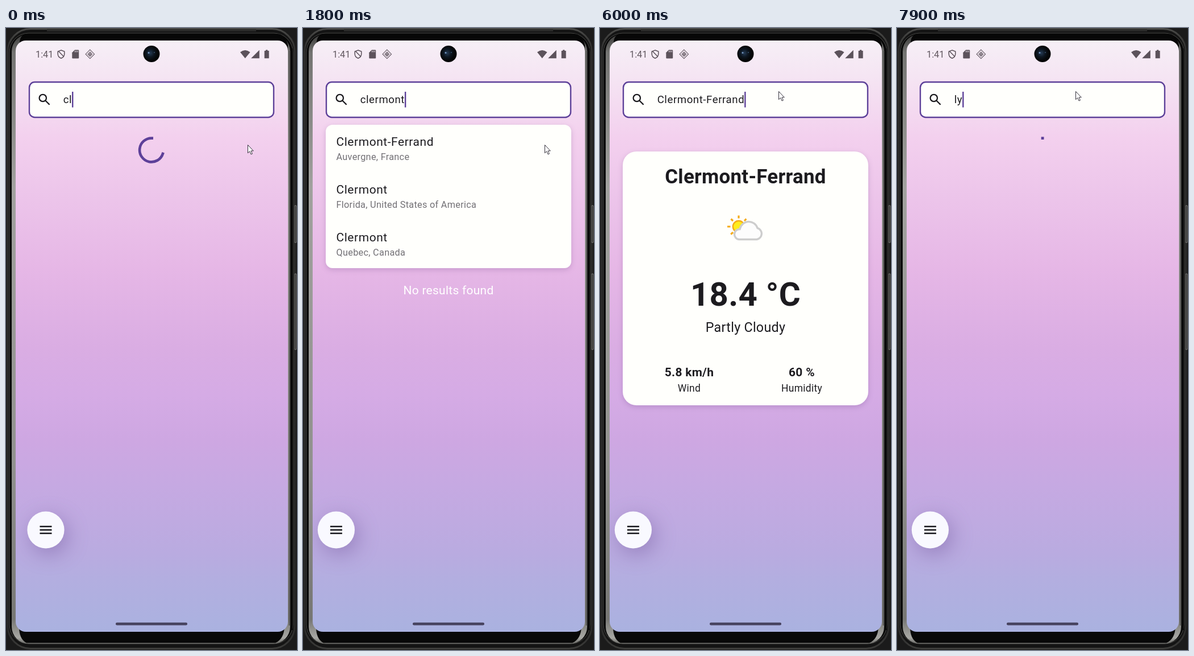
Recreate the animation shown at these times as an HTML page. Size 512 by 1093 pixels, loop 8 s.

```html
<!DOCTYPE html>
<html lang="en">
<head>
<meta charset="utf-8">
<title>Weather search</title>
<style>
  html, body { margin: 0; width: 100%; height: 100%; overflow: hidden; background: #1b1b1b; }
  svg { display: block; width: 512px; height: 1093px; }
  text { font-family: Roboto, sans-serif; fill: #1c1b1f; letter-spacing: .29px; white-space: pre; }
  .mid { text-anchor: middle; }
  .field { font-size: 18.6px; letter-spacing: .58px; }
  .place { font-size: 20.93px; letter-spacing: .58px; }
  .region { font-size: 16.28px; fill: #727075; }
  .city { font-size: 34.89px; font-weight: 700; }
  .degrees { font-size: 58.15px; font-weight: 700; }
  .sky { font-size: 23.26px; }
  .value { font-size: 20.93px; font-weight: 700; }
  .label { font-size: 17.45px; }
  .none { font-size: 20.93px; fill: #fff; }
  .panel { fill: #fffffc; filter: drop-shadow(0 3px 5px rgba(90, 50, 120, .22)); }
  .fab { filter: drop-shadow(6px 10px 18px rgba(85, 55, 130, .36)); }
  .accent { stroke: #5d4099; fill: none; }
</style>
</head>
<body>
<svg viewBox="0 0 512 1093">
  <defs>
    <linearGradient id="sky" gradientUnits="userSpaceOnUse" x1="0" y1="22" x2="0" y2="1061">
      <stop offset="0" stop-color="#f6eff6"/>
      <stop offset=".06" stop-color="#f5e5f3"/>
      <stop offset=".165" stop-color="#f3d0ee"/>
      <stop offset=".27" stop-color="#ecc4ea"/>
      <stop offset=".385" stop-color="#e6b7e6"/>
      <stop offset=".52" stop-color="#daade3"/>
      <stop offset=".6" stop-color="#d5abe5"/>
      <stop offset=".675" stop-color="#cea7e2"/>
      <stop offset=".75" stop-color="#c6a9e2"/>
      <stop offset=".87" stop-color="#b9abe0"/>
      <stop offset=".91" stop-color="#b3aee0"/>
      <stop offset="1" stop-color="#aab2e0"/>
    </linearGradient>
    <linearGradient id="metal" x1="0" y1="0" x2="0" y2="1">
      <stop offset="0" stop-color="#3a3a39"/>
      <stop offset=".03" stop-color="#747472"/>
      <stop offset=".25" stop-color="#a2a29f"/>
      <stop offset=".7" stop-color="#92928f"/>
      <stop offset=".96" stop-color="#777774"/>
      <stop offset=".99" stop-color="#a8a8a4"/>
      <stop offset="1" stop-color="#6a6a67"/>
    </linearGradient>
    <linearGradient id="rim" x1="0" y1="0" x2="0" y2="1">
      <stop offset="0" stop-color="#4a4a48"/>
      <stop offset=".03" stop-color="#30302f"/>
      <stop offset=".97" stop-color="#2b2b2a"/>
      <stop offset="1" stop-color="#3c3c3a"/>
    </linearGradient>
    <radialGradient id="lens" cx=".42" cy=".45" r=".6">
      <stop offset="0" stop-color="#253b55"/>
      <stop offset=".4" stop-color="#0d1620"/>
      <stop offset=".75" stop-color="#050607"/>
    </radialGradient>
    <clipPath id="glass"><rect x="17" y="22" width="479" height="1039" rx="18"/></clipPath>
  </defs>

  <!-- phone body -->
  <rect width="512" height="1093" fill="#1b1b1b"/>
  <rect x="3" y="1.5" width="505" height="1089" rx="40" fill="#141414" stroke="url(#rim)" stroke-width="3"/>
  <rect x="6" y="9" width="499" height="1073" rx="34" fill="#080808" stroke="#484846"/>
  <path d="M72 2H440V6H72z" fill="#2b2b2a"/>
  <rect x="10" y="11" width="490" height="1071" rx="30" fill="url(#metal)"/>
  <path d="M34 10.500H480Q492 13 496 30V40H24V24Q25 13 34 10.500z" fill="#070707"/>
  <path d="M23 1052Q23 1074 36 1080.500H474Q489 1074 490 1052z" fill="#080808"/>
  <path d="M499 40V1050" stroke="#5c5c5a" stroke-width="3"/>
  <path d="M502.500 36V1058" stroke="#090909" stroke-width="4"/>
  <path d="M508 312h2.500v65H508zM508 432h2.500v133H508z" fill="#222" stroke="#80807d"/>

  <!-- screen -->
  <g clip-path="url(#glass)">
    <rect x="17" y="22" width="479" height="1039" fill="url(#sky)"/>

    <text x="52" y="51.5" style="font-size:16.3px;letter-spacing:0;fill:#61575f">1:41</text>
    <g fill="#5c525b">
      <path d="M97 39l5.800 2.300v4.200c0 3.800-2.300 6.400-5.800 7.800-3.500-1.400-5.800-4-5.800-7.800v-4.200zM92.500 41l9 9" fill="none" stroke="#5c525b" stroke-width="1.500"/>
      <path d="M121 38.500h6a1.200 1.200 0 0 1 1.200 1.200v12.600a1.200 1.200 0 0 1-1.200 1.200h-9.500a1.200 1.200 0 0 1-1.200-1.200v-9z"/>
      <path d="M121.500 40v2.500m2.300-2.500v2.500m2.300-2.500v2.500" stroke="#f3e9f2"/>
      <path d="M147.800 38.200l7.700 7.700-7.700 7.700-7.700-7.700z" fill="none" stroke="#6b616a" stroke-width="1.200"/>
      <path d="M147.800 42.300l3.600 3.600-3.600 3.600-3.600-3.600zM146 44l3.600 3.800M149.600 44l-3.600 3.800" fill="none" stroke="#6b616a" stroke-width="1.300"/>
      <path d="M412 42.500Q420.800 35.500 429.600 42.500L420.800 53.300z"/>
      <path d="M445.800 38.700V53.300H431.200z"/>
      <path d="M457 38.500h3.400v1.500h2.300v13.300h-8V40h2.300z"/>
    </g>
    <circle cx="256" cy="45.5" r="14.5" fill="url(#lens)"/>
    <circle cx="251" cy="43.5" r="1.5" fill="#7395c0"/>
    <circle cx="261" cy="43" r="1" fill="#39536f"/>

    <rect x="41" y="95" width="430" height="62" rx="9.5" class="accent" stroke-width="2.4" style="fill:#fffffc"/>
    <path d="M71 123a6.200 6.200 0 1 1-12.400 0a6.200 6.200 0 1 1 12.400 0M69.300 127.500l7.300 7.300" fill="none" stroke="#1c1b1f" stroke-width="2.3"/>
    <text id="query" class="field" x="100.7" y="132"></text>
    <rect id="caret" y="112" width="2.4" height="27.5" fill="#5d4099"/>

    <path id="spinner" class="accent" stroke-width="4.65" stroke-linecap="square"/>

    <g id="list">
      <rect class="panel" x="40" y="170" width="432" height="252" rx="12"/>
      <text class="place" x="58.5" y="206.5">Clermont-Ferrand</text>
      <text class="region" x="58.5" y="232">Auvergne, France</text>
      <text class="place" x="58.5" y="290.5">Clermont</text>
      <text class="region" x="58.5" y="316">Florida, United States of America</text>
      <text class="place" x="58.5" y="374.5">Clermont</text>
      <text class="region" x="58.5" y="400">Quebec, Canada</text>
      <text class="none mid" x="256" y="468">No results found</text>
    </g>

    <g id="card">
      <rect class="panel" x="40" y="217" width="432" height="446" rx="24"/>
      <text class="city mid" x="256" y="273">Clermont-Ferrand</text>
      <g id="weather">
        <path d="M244 334.500v-5M254 339l3.300-3.600M234 339l-3.500-3.500M229.500 349h-5.500M234 359l-3.800 3.500" stroke="#f5ab18" stroke-width="3.2" fill="none"/>
        <circle cx="244" cy="349" r="10.2" fill="#ffec1c" stroke="#f5ab18" stroke-width="2.4"/>
        <path d="M245 371.500a9 9 0 0 1 1-18a16 16 0 0 1 31-2a10.300 10.300 0 0 1-1 20z" fill="#fdfdfd" stroke="#cdcdcd" stroke-width="3.4"/>
      </g>
      <text class="degrees mid" x="256" y="487.5">18.4 °C</text>
      <text class="sky mid" x="256" y="534">Partly Cloudy</text>
      <text class="value mid" x="157" y="612">5.8 km/h</text>
      <text class="label mid" x="157" y="639">Wind</text>
      <text class="value mid" x="355" y="612">60 %</text>
      <text class="label mid" x="355" y="639">Humidity</text>
    </g>

    <g id="fab">
      <circle class="fab" r="32.6" fill="#f9f9ff"/>
      <path d="M-10.500-6h21M-10.500 0h21M-10.500 6h21" stroke="#15151a" stroke-width="2.4"/>
    </g>

    <rect x="193" y="1044.8" width="126" height="4.7" rx="2.3" fill="#47435f"/>
    <path id="pointer" d="M0 0v14.200l3.200-3 2.400 5.300 2.300-1-2.400-5.100h4.300z" fill="#fff" stroke="#33303a" stroke-width="1"/>
  </g>
</svg>
<script>
const LOOP = 8000, STEP = 100;
const $ = id => document.getElementById(id);
const CITY = 'Clermont-Ferrand';

// Each table holds [start time, value]; a value lasts until the next row.
const typed = [
  [0, 'cl'], [700, 'cle'], [900, 'cler'], [1000, 'clerm'], [1100, 'clermo'],
  [1300, 'clermon'], [1400, 'clermont'], [4000, CITY],
  [6600, CITY.slice(0, -1)], [6700, CITY.slice(0, 8)], [6800, ''],
  [7500, 'l'], [7700, 'ly']
];
const views = [[0, 'spinner'], [1700, 'list'], [4000, 'card'], [6600, 'list'], [7900, 'spinner']];
const spinStarts = [[0, -470], [800, 800], [7900, 7900]];
const carets = [[0, true], [2200, false], [5600, true]];

const at = (table, t) => table.filter(row => row[0] <= t).pop()[1];
const clamp = v => Math.min(1, Math.max(0, v));
const mix = (a, b, k) => a + (b - a) * k;
const easeInOut = k => k * k * (3 - 2 * k);
const easeOut = k => 1 - (1 - k) ** 3;
const span = (t, from, to, ease = easeInOut) => ease(clamp((t - from) / (to - from)));

// cubic-bezier(.4, 0, .2, 1)
function fastOutSlowIn(x) {
  let lo = 0, hi = 1;
  for (let i = 0; i < 20; i++) {
    const s = (lo + hi) / 2, r = 1 - s;
    if (1.2 * r * r * s + .6 * r * s * s + s ** 3 < x) lo = s; else hi = s;
  }
  return easeInOut(lo);
}

function arcPath(age) {
  const cycle = age % 1333 / 1333, turn = age % 2222 / 2222;
  const head = fastOutSlowIn(clamp(cycle * 2));
  const tail = fastOutSlowIn(clamp(cycle * 2 - 1));
  const start = Math.PI * (-.5 + 1.5 * tail + 2 * turn + .5 * cycle);
  const sweep = Math.max(1.5 * Math.PI * (head - tail), .01);
  const point = a => `${256 + 20.9 * Math.cos(a)} ${214.5 + 20.9 * Math.sin(a)}`;
  return `M${point(start)}A20.9 20.9 0 ${+(sweep > Math.PI)} 1 ${point(start + sweep)}`;
}

const show = (id, on) => $(id).style.display = on ? '' : 'none';
const move = (id, x, y) => $(id).setAttribute('transform', `translate(${x} ${y})`);

function draw(t) {
  const text = at(typed, t), view = at(views, t);
  $('query').textContent = text;
  $('caret').setAttribute('x', 100.6 + (text ? $('query').getComputedTextLength() : 0));
  show('caret', at(carets, t));

  for (const id of ['spinner', 'list', 'card']) show(id, id === view);
  show('weather', t >= 4900);
  if (view === 'spinner') $('spinner').setAttribute('d', arcPath(t - at(spinStarts, t)));

  move('fab', mix(70, 58.4, span(t, 0, 400, easeOut)), 882);

  const left = span(t, 2900, 3400), up = span(t, 4300, 4800);
  move('pointer', mix(mix(425.5, 155.5, left), 314.5, up), mix(mix(205.5, 211.5, left), 111.5, up));
}

const began = performance.now();
function tick() {
  const t = (performance.now() - began) % LOOP;
  draw(Math.floor(t / STEP) * STEP);
  requestAnimationFrame(tick);
}
tick();
</script>
</body>
</html>
```
